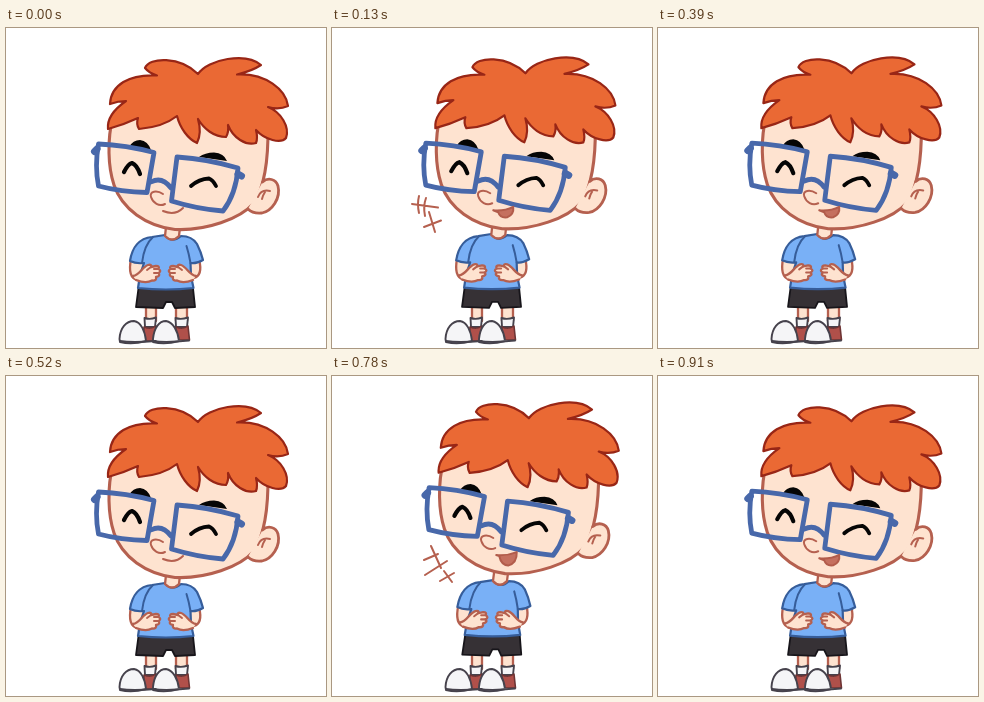
Animation of 320 by 320 pixels, one loop 1.04 s. Source, as an HTML page:

```html
<!DOCTYPE html>
<html lang="en">
<head>
<meta charset="utf-8">
<title>Laughing boy</title>
<style>
  html, body { margin: 0; width: 100%; height: 100%; overflow: hidden; background: #fff; }
  svg { display: block; width: 100vw; height: 100vh; }
  svg * { stroke-linecap: round; stroke-linejoin: round; }
  .skin { fill: #fee3d0; stroke: #b5604f; stroke-width: 2.3; }
  .line { fill: none; stroke: #b5604f; stroke-width: 2; }
  .hair { fill: #ea6934; stroke: #982616; stroke-width: 2.2; }
  .shirt { fill: #79b0f6; stroke: #365d9a; stroke-width: 2.2; }
  .seam { fill: none; stroke: #365d9a; stroke-width: 2; }
  .frame { fill: none; stroke: #4868aa; stroke-width: 4.8; }
  .shoe { fill: #f5f5f7; stroke: #46424c; stroke-width: 1.9; }
  .red { fill: #b0504a; stroke: #6e3434; stroke-width: 1.6; }
  .ink { fill: #050505; }
  .eye { fill: none; stroke: #050505; stroke-width: 4.2; }
  .lips { fill: #c5705f; stroke: #b25c4b; stroke-width: 2; }
</style>
</head>
<body>
<svg viewBox="0 0 320 320">
  <g id="feet">
    <path class="skin" d="M140 277V293H150V277Z M170 277V293H181V277Z"/>
    <path class="shoe" d="M138.500 290Q144 292 150 289.500L149 299H139Z M169.500 290Q175 292 182 289.500L181 299H170Z"/>
    <path class="red" d="M138 299Q145 302 150 298L151 313H137Z M170 299Q177 302 182 298L183.500 312H169Z"/>
    <path class="shoe" d="M113.500 311C114 300 120 293 128 293C135 294 139 303 140 313Q126 317 114 314Z"/>
    <path class="shoe" d="M147 311C148 300 153 293 160 293C167 294 172 303 173 313Q159 317 147 314Z"/>
    <path class="shoe" d="M114 313Q126 315 150 313M147 313Q160 315 183 312.500" fill="none"/>
  </g>

  <g id="body">
    <path fill="#363135" stroke="#17151a" stroke-width="1.8" d="M132.500 260H187L189 279L169 280L166 274H160L157 280L130 279Z"/>
    <path class="skin" d="M125 231C123 241 124 250 131 252L143 248L140 233Z M181 233L179 248L188 250C195 248 195 239 193 231Z"/>
    <path class="shirt" d="M146 209L159 207Q166 216 175 208Q186 208 191 216Q195 224 197 232Q190 236 184.500 235L185 248L187.500 260Q160 263 132 260L134 247L138 235Q130 236 124 233C126 220 133 210 146 209Z"/>
    <path class="seam" d="M147 209Q138 217 136 235M184.500 235Q183 226 180.500 218"/>
    <path class="skin" d="M160 199L159 208Q166 215 173 208L174 199Z"/>
    <g id="hand">
      <path class="skin" d="M127 248C134 247 136 239 142 237Q146 236 145 239L150 238Q154 238 152.500 241Q156 243 152.500 245Q155 248 150 249Q151 253 146 252.500Q140 256 130 252"/>
      <path class="line" d="M145 239L141 242M152 241L148 241M152 245L148 245"/>
    </g>
    <use href="#hand" transform="matrix(-1 0 0 1 317 0)"/>
  </g>

  <g id="head">
    <path class="skin" style="stroke-width:3.100" d="M107 88C101 112 102 139 108 157C116 181 140 198 169 201.500C200 203 234 191 248 175C259 158 262.500 133 262 98Q185 52 107 88Z"/>
    <path class="skin" style="stroke-width:2.800" d="M256.500 154C262 149 270 151 272 158C275 170 266 183 256 185Q247 186 242 181"/>
    <path class="line" d="M252 169Q255 161 264 163M256 171Q257 167 259 164"/>
    <path class="ink" d="M123 119Q127 112 134 112Q142 113 145 122Z M193 129Q199 124.500 208 124.500Q218 125 221 133Z"/>
    <path class="hair" d="M102 101C101 91 107 82 120 73Q112 73 104 76C105 57 123 46 151 47.500Q143 45 139 40C143 29 174 28 192 46C202 31 240 24 255 37Q246 43 231 46.500C260 45 280 62 282 78Q273 82 262 79C275 84 284 99 280 110C275 116 259 112 250 102Q252 110 250 115C240 118 227 110 222 97Q223 104 220 109C208 109 198 101 192 91Q196 105 191 115C182 111 174 100 171 88Q157 99 133 101Q130 96 132 90Q117 97 102 101Z"/>
    <path class="eye" d="M118 144Q122 136 126 135Q131 137 134 146"/>
    <path class="eye" style="stroke-width:3.800" d="M185 158Q193 151 203 150.500Q207 152 210 158"/>
    <path class="frame" d="M92.500 116Q120 117 148 124.500L141 164.500Q115 164 92.500 158Q88.500 138 92.500 116Z M171 129Q202 131 232 140Q230 166 217 183Q191 181 165.500 173Z M145 154Q156 148 165 160"/>
    <path class="frame" style="stroke-width:7" d="M91 121L88.500 123.500M232 146L235.500 148"/>
    <path class="line" d="M157 166C151 162 143 163 145 169C147 175 153 179 159 176"/>
    <path class="line" data-mouth="0" d="M157 183Q169 188 177 180"/>
    <path class="lips" data-mouth="1" d="M160 183Q171 184 180 179.500Q181 187 174 190Q167 191 165 185Z"/>
    <path class="lips" data-mouth="2" d="M160 183Q171 184 180.500 180Q181 191 172 193.500Q165 193 163 184Z"/>
  </g>

  <path class="line" data-marks="1" d="M80 176L106 179.500M87 168Q85 176 87 185M94 170Q91 178 93 188M92 199L109 192.500M97 184L103 204"/>
  <path class="line" data-marks="2" d="M99 170L109 192M92 184L106 178M93 199L115 185M108 205L122 197M112 195L120 206"/>
</svg>
<script>
  const STEP = 130;
  // head shift x, y and tilt; body lean and stretch; mouth; laugh marks
  const low = [0, 0, 0, 0, 1, 0, 0];
  const mid = [1.3, -0.7, 0.1, 0.003, 1.012, 1, 0];
  const high = [4.5, -3.8, 0.3, 0.024, 1.036, 2, 2];
  const poses = [low, [...mid.slice(0, 6), 1], high, mid];
  const FLOOR = 290;
  const $ = id => document.getElementById(id);

  function show(name, value) {
    for (const el of document.querySelectorAll(`[data-${name}]`))
      el.style.display = +el.dataset[name] === value ? "" : "none";
  }

  function draw(pose) {
    const [x, y, tilt, lean, tall, mouth, marks] = pose;
    $("head").setAttribute("transform", `translate(${x} ${y}) rotate(${tilt} 190 130)`);
    $("body").setAttribute("transform",
      `matrix(1 0 ${-lean} ${tall} ${lean * FLOOR} ${FLOOR * (1 - tall)})`);
    show("mouth", mouth);
    show("marks", marks);
  }

  let last = -1;
  const start = performance.now();
  function tick(now) {
    const i = Math.floor(Math.max(0, now - start) / STEP) % poses.length;
    if (i !== last) draw(poses[last = i]);
    requestAnimationFrame(tick);
  }
  draw(poses[0]);
  requestAnimationFrame(tick);
</script>
</body>
</html>
```
